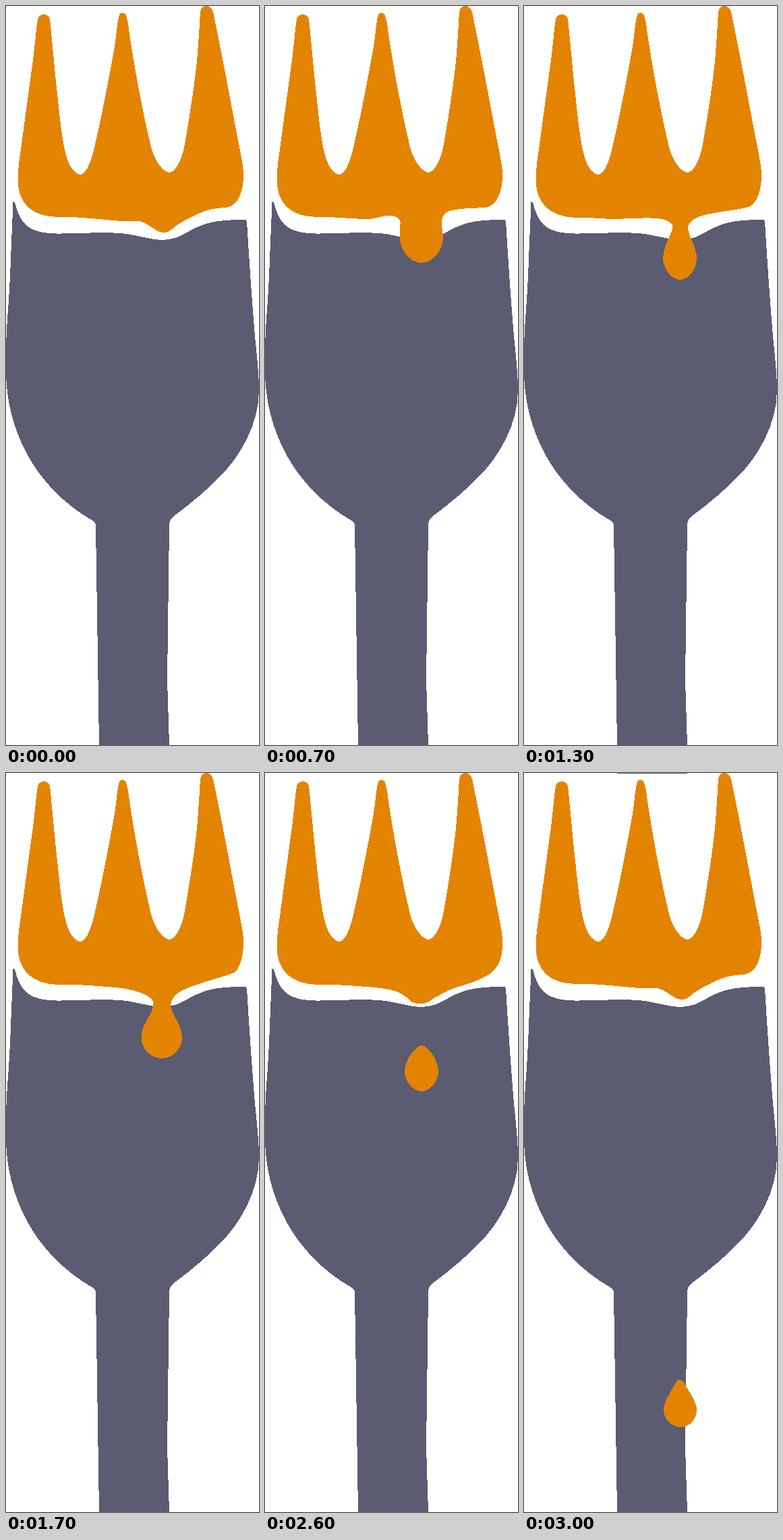
An HTML page without scripts that plays this animation: 375 by 1096 pixels, repeating every 3.1 s.

```html
<!DOCTYPE html>
<html lang="en">
<head>
<meta charset="utf-8">
<title>Dripping fork</title>
<style>
  html, body { margin: 0; height: 100%; overflow: hidden; background: #fff; }
  svg { display: block; width: 100%; height: 100%; shape-rendering: crispEdges; }
  .slate { fill: #5b5b72; }
  .amber { fill: #e38400; }

  /* All motion advances in 100 ms ticks. */
  .edge { animation: drip 3.1s infinite; }
  .drop { animation: fall 3.1s infinite, show 3.1s step-end infinite; }
  .rim { animation: flash 3.1s step-end infinite; }

  @keyframes drip {
    0% {
      animation-timing-function: steps(7);
      d: path("M18,252 C15,290 36,313 78,313 C110,312.5 135,316 165,318.5 C180,320 190,318 197,319 C203,320 208,323 212,325.5 C216,328 219,330.5 222,332 C226,335 231,336 235,336 C239,336 243,333.5 246,331 C249,328 253,325 258,322 C268,316 280,310 290,306 C306,299 318,300 328,298.5 C344,296 352,274 352,252Z");
    }
    22.58% {
      animation-timing-function: steps(6);
      d: path("M18,252 C15,290 36,313 78,313 C105,312.5 130,316 155,316 C168,314 180,309.5 190,311.5 C199,313 201,318 200.5,323 C200,330 199.5,336 200,344 C200,362 215,381 232,381 C249,381 264,362 264,344 C264,334 260.5,326 262,317 C264,309 268,305 277,303 C295,299 312,300.5 328,298.5 C344,296 352,274 352,252Z");
    }
    41.93% {
      animation-timing-function: steps(4);
      d: path("M18,252 C15,290 36,313 78,314 C100,313 115,316 135,316 C160,315.5 185,312.5 205,316 C217,319 222,324 220,331 C216,344 206,358 206,374 C206,390 219,406 231.5,406 C244,406 256,390 256,374 C256,357 245,344 243,331 C242,323 248,317 260,312 C282,305 325,302 335,297 C346,292 352,270 352,252Z");
    }
    54.82% {
      animation-timing-function: step-end;
      d: path("M18,252 C15,290 36,313 78,314 C100,313 125,315 150,317 C170,318 187,321 200,326 C216,332 220,338 218,347 C215,360 200.5,374 200.5,392 C200.5,410 215,423 231,423 C247,423 261,410 261,392 C261,374 247,360 244.5,347 C243,337 249,329 262,322 C285,311 325,302 338,296 C347,291 352,270 352,252Z");
    }
    /* The bulge is handed over to the separate drop here. */
    54.83% {
      animation-timing-function: steps(5);
      d: path("M18,252 C15,290 36,313 78,314 C100,313 125,315 150,317 C170,318 187,321 200,326 C216,332 220,338 218,347 C218,349 219,350 220,351 C224,353 228,353 231,353 C235,353 239,353 243,351 C244,350 244.5,349 244.5,347 C243,337 249,329 262,322 C285,311 325,302 338,296 C347,291 352,270 352,252Z");
    }
    70.96% {
      animation-timing-function: steps(4);
      d: path("M18,252 C15,290 36,313 78,314 C100,313 115,314 135,315.5 C160,318 185,323 200,329 C208,332 215,337 220,343 C223,346 224,349 226,351 C228,353 230,353.5 232,353.5 C234,353.5 236,353 238,351 C241,349 243,347 247,344 C255,337 264,328 280,320 C297,313 318,308 330,300 C346,290 352,276 352,252Z");
    }
    83.87% {
      animation-timing-function: steps(4);
      d: path("M18,252 C15,290 36,313 78,314 C100,313 125,315 150,317 C168,318 182,320 195,324 C201,326 205,329 209,332 C213,336 215,338 218,340 C222,342 226,342 230,342 C235,342 239,342 243,339 C247,336 251,333.5 256,331 C264,326 272,322 280,319 C300,313 315,309 330,300 C346,290 352,276 352,252Z");
    }
    96.77%, 100% {
      d: path("M18,252 C15,290 36,313 78,313 C110,312.5 135,316 165,318.5 C180,320 190,318 197,319 C203,320 208,323 212,325.5 C216,328 219,330.5 222,332 C226,335 231,336 235,336 C239,336 243,333.5 246,331 C249,328 253,325 258,322 C268,316 280,310 290,306 C306,299 318,300 328,298.5 C344,296 352,274 352,252Z");
    }
  }

  @keyframes fall {
    0%, 54.83% {
      animation-timing-function: steps(5);
      d: path("M231,344 C226,344 219,344 218,347 C215,360 200.5,374 200.5,392 C200.5,410 215,423 231,423 C247,423 261,410 261,392 C261,374 247,360 244.5,347 C243,344 236,344 231,344Z");
    }
    70.96% {
      animation-timing-function: steps(4);
      d: path("M232.5,357.5 C230,357.5 229,360 229,363 C230,390 207,398 207,417 C207,431 219,442 232,442 C245,442 256,431 256,417 C256,398 233,390 236,363 C236,360 235,357.5 232.5,357.5Z");
    }
    83.87% {
      /* quadratic acceleration, one value per tick */
      animation-timing-function: linear(0 0% 25%, .063 25% 50%, .25 50% 75%, .563 75% 100%, 1);
      d: path("M232,404 C229,404 226,406 224,408 C215,416 207,430 207,443 C207,458 220,472 232,472 C244,472 257,458 257,443 C257,430 249,416 240,408 C238,406 235,404 232,404Z");
    }
    96.77%, 100% {
      d: path("M231,900 C228,900 226,902 225,904 C220,914 207,932 207,944 C207,959 219,970 232,970 C245,970 256,959 256,944 C256,932 242,914 237,904 C236,902 234,900 231,900Z");
    }
  }

  @keyframes show {
    0% { opacity: 0; }
    54.83%, 100% { opacity: 1; }
  }
  @keyframes flash {
    0% { opacity: 0; }
    96.77%, 100% { opacity: 1; }
  }
</style>
</head>
<body>
<svg viewBox="0 0 375 1096" preserveAspectRatio="none">
  <path class="slate rim" d="M138,0H242V1H138Z"/>
  <path class="slate" d="M10.5,291 C13,287 15,300 17,304 C25,328 41,337 75,337.5 C110,338 160,333 190,340 C220,346 230,350 250,344 C265,340 275,329 300,322 C320,317 340,317 356,317.5 L357,320 C360,370 366,460 370,500 C373,530 375,550 375,570 C375,620 347,667 320,695 C297,719 270,741 248,757 Q242,762 242,770 L239,1000 L242,1096 H138 L133,771 Q133,766 128,763 C40,712 0,625 0,540 C-1,480 4,450 6,400Z"/>
  <path class="amber" d="M18,256 C18,235 20,228 23,205 L40,80 C43,57 45,30 47,20 C48,10 63,10 65,19 C67,38 72,95 77,140 C81,178 84,206 91,228 C96,242 104,250 110,250 C118,250 124,235 129,218 C138,183 155,95 161,60 C164,40 165,22 168,13 C170,9 176,9 178,14 C181,22 182,36 185,55 C194,112 205,168 215,209 C220,230 234,247 242,247 C252,247 262,224 265,205 C272,165 282,100 284,70 C286,45 287,25 288,9 C289,-3 304,-3 307,9 C320,70 340,180 348,220 C351,235 352,240 352,256Z"/>
  <path class="amber edge"/>
  <path class="amber drop"/>
</svg>
</body>
</html>
```
